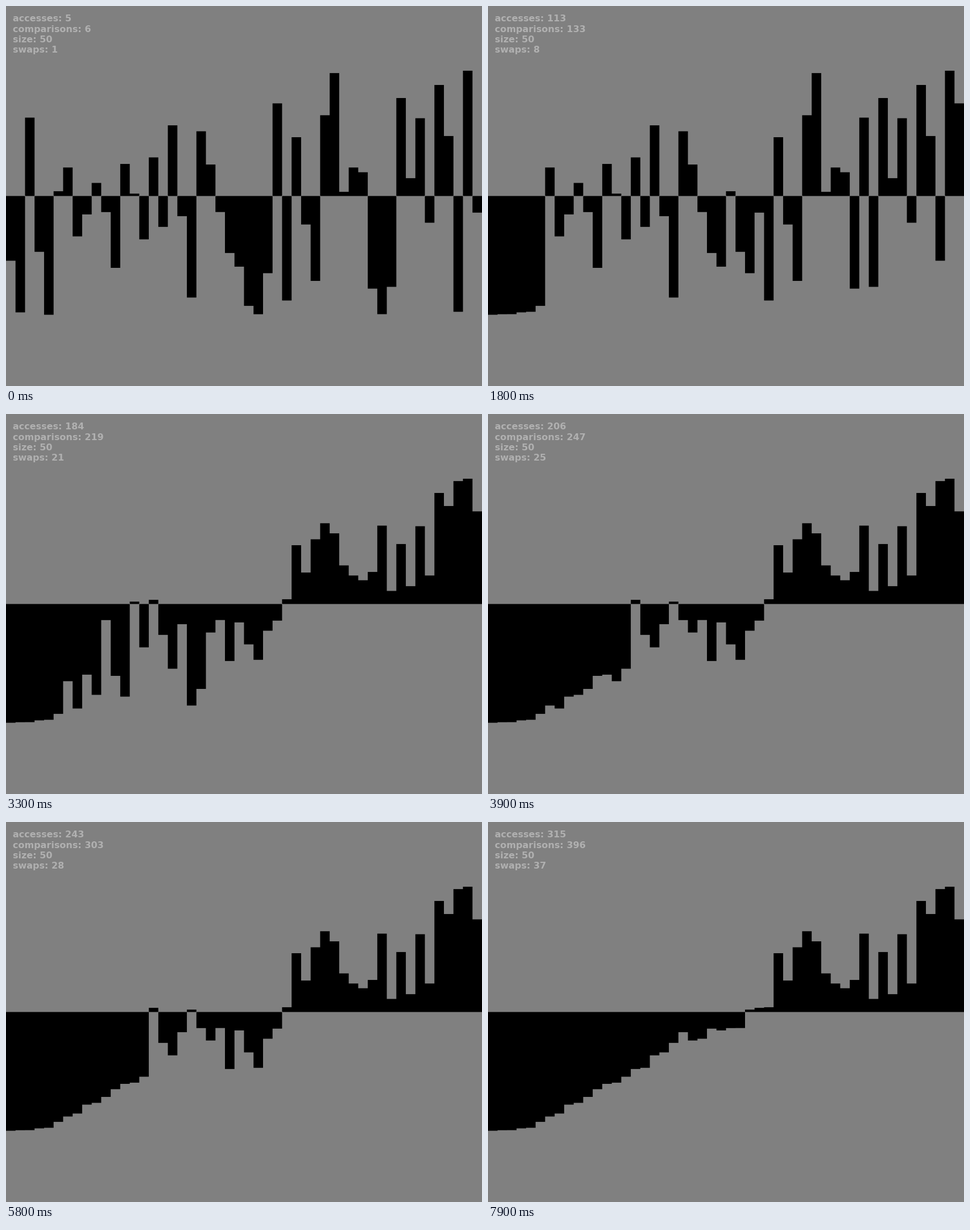
Animation, 837 px wide and 669 px high, one loop 8000 ms. Source, as a matplotlib script:

```python
import matplotlib.pyplot as plt
from matplotlib.animation import FuncAnimation

W, H, DPI = 837, 669, 64
UNITS_W, UNITS_H = 800, 640  # drawing units, stretched over the stage
FRAMES, INTERVAL = 80, 100
GREY, INK = "#808080", "#b0b0b0"

# The unsorted input, as bar heights above or below the middle line
HEIGHTS = [
    -109, -196, 132, -94, -200, 8, 48, -68, -31, 22,
    -27.1, -121, 54, 4, -73, 65, -52, 119, -34, -171,
    109, 53, -27, -96, -119, -185, -199.1, -130, 156, -176,
    99, -48, -143, 136, 207, 7, 48, 40, -156, -199,
    -153, 165, 30, 131, -45, 187, 101, -195, 211, -28,
]


def record(values):
    """Quicksort the values and keep a snapshot after every index check."""
    a = list(values)
    n = {"accesses": 0, "comparisons": 0, "size": len(a), "swaps": 0}
    shots = []

    def snap():
        n["comparisons"] += 1
        shots.append((a[:], dict(n)))

    def less(x, y):
        n["accesses"] += 1
        n["comparisons"] += 1
        return x < y

    def sort(left, right):
        if left >= right:
            snap()
            return
        n["comparisons"] += 1
        n["accesses"] += 1
        pivot = a[(left + right + 1) // 2]
        i, j = left, right
        while True:
            while less(a[i], pivot):
                i += 1
            while less(pivot, a[j]):
                j -= 1
            if i >= j:
                snap()
                break
            n["swaps"] += 1
            snap()  # the swap shows up one step after it is counted
            a[i], a[j] = a[j], a[i]
            i, j = i + 1, j - 1
        sort(left, i - 1)
        sort(i, right)

    sort(0, len(a) - 1)
    return shots


shots = record(HEIGHTS)
del shots[1]  # the opening step runs at double speed

fig = plt.figure(figsize=(W / DPI, H / DPI), dpi=DPI, facecolor=GREY)
ax = fig.add_axes([0, 0, 1, 1])
ax.axis("off")

bar_w = UNITS_W / len(HEIGHTS)
edges = [k * bar_w for k in range(len(HEIGHTS) + 1)]
bars = ax.stairs(HEIGHTS, edges, baseline=0, fill=True, color="black",
                 linewidth=0, snap=False)
ax.set(xlim=(0, UNITS_W), ylim=(-UNITS_H / 2, UNITS_H / 2))

lines = {
    name: ax.text(11, 294 - 17.6 * row, "", color=INK, family="DejaVu Sans",
                  weight="bold", size=16 * 72 / DPI, va="baseline")
    for row, name in enumerate(shots[0][1])
}


def update(frame):
    heights, counts = shots[frame]
    bars.set_data(heights)
    for name, line in lines.items():
        line.set_text(f"{name}: {counts[name]}")
    return [bars, *lines.values()]


anim = FuncAnimation(fig, update, frames=FRAMES, interval=INTERVAL,
                     repeat=True, repeat_delay=0, blit=False)
plt.show()
```
